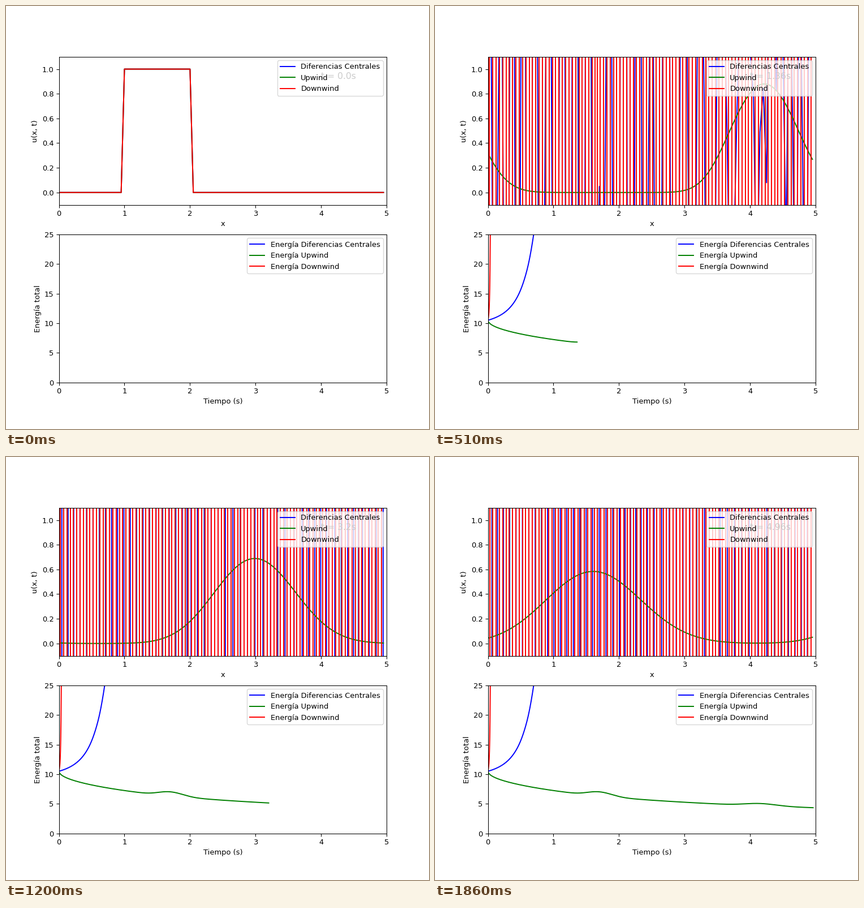
Animation, 748 px wide and 748 px high, one loop 1.89 s. Source, as a matplotlib script:

```python
import numpy as np
import matplotlib.pyplot as plt
from matplotlib.animation import FuncAnimation

plt.rcParams["font.family"] = "DejaVu Sans"

# Advection u_t + c u_x = 0, solved with three explicit schemes
LENGTH, N, C, DT = 5.0, 100, 2.0, 0.004
FRAMES, SKIP = 63, 20
STEPS = (FRAMES - 1) * SKIP
DX = LENGTH / N
NU = C * DT / DX

x = np.arange(N) * DX
times = np.arange(STEPS + 1) * DT

SCHEMES = [
    ("Diferencias Centrales", "blue", lambda u: (u[2:] - u[:-2]) / 2),
    ("Upwind", "green", lambda u: u[1:-1] - u[:-2]),
    ("Downwind", "red", lambda u: u[2:] - u[1:-1]),
]


def solve(diff):
    """All time levels, with periodic ghost cells at both ends."""
    u = np.zeros((STEPS + 1, N))
    u[0, 20:41] = 1.0
    for n in range(STEPS):
        u[n + 1, 1:-1] = u[n, 1:-1] - NU * diff(u[n])
        u[n + 1, 0] = u[n + 1, -2]
        u[n + 1, -1] = u[n + 1, 1]
    return u


def energy(u):
    return np.minimum(0.5 * np.sum(u**2, axis=1), 1e6)


fig, (ax_u, ax_e) = plt.subplots(2, 1, figsize=(8, 8), dpi=93.5)

waves, energies, wave_lines, energy_lines = [], [], [], []
for name, color, diff in SCHEMES:
    u = solve(diff)
    waves.append(u)
    energies.append(energy(u))
    wave_lines += ax_u.plot([], [], color=color, label=name)
    energy_lines += ax_e.plot([], [], color=color, label=f"Energía {name}")

ax_u.set(xlim=(0, LENGTH), ylim=(-0.1, 1.1), xlabel="x", ylabel="u(x, t)")
ax_e.set(xlim=(0, 5), ylim=(0, 25), xlabel="Tiempo (s)", ylabel="Energía total")
for ax in (ax_u, ax_e):
    ax.legend(loc="upper right")
clock = ax_u.text(0.8, 0.85, "", transform=ax_u.transAxes, fontsize=12)


def update(frame):
    n = frame * SKIP
    for line, u in zip(wave_lines, waves):
        line.set_data(x, u[n])
    for line, e in zip(energy_lines, energies):
        line.set_data(times[:n + 1], e[:n + 1])
    clock.set_text(f"t = {round(float(times[n]), 2)}s")
    return [*wave_lines, *energy_lines, clock]


anim = FuncAnimation(fig, update, frames=FRAMES, interval=30, repeat=True,
                     repeat_delay=0)
plt.show()
```
